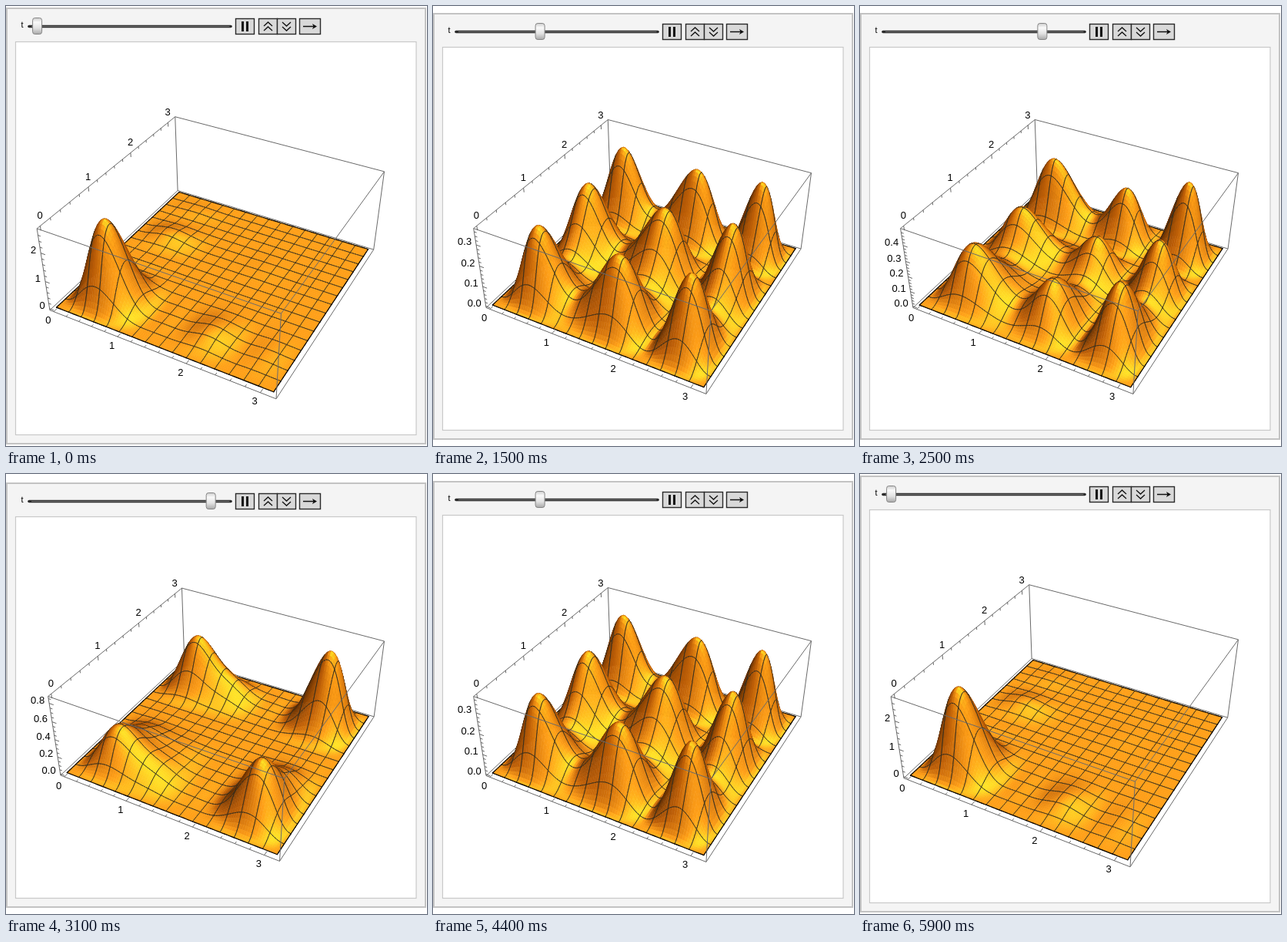
Animation, 547 px wide and 571 px high, one loop 6 s. Source, as an HTML page with a canvas:

```html
<!DOCTYPE html>
<html>
<head>
<meta charset="utf-8">
<style>
html, body { margin: 0; width: 100%; height: 100%; overflow: hidden; background: #fff; }
canvas { display: block; }
</style>
</head>
<body>
<canvas id="stage" width="547" height="571"></canvas>
<script>
const ctx = document.getElementById('stage').getContext('2d');
const PI = Math.PI, PAD = 1.04, CELLS = 96, MESH = 6, FONT = '"Liberation Sans", Arial, sans-serif';

// Probability density of four equally mixed box states in one dimension
function density(x, t) {
  let re = 0, im = 0;
  for (let n = 1; n <= 4; n++) {
    re += Math.sin(n * x) * Math.cos(n * n * t);
    im += Math.sin(n * x) * Math.sin(n * n * t);
  }
  return (re * re + im * im) / (2 * PI);
}

// Perspective camera at (1.3, -2.4, 2) looking at the box centre
const view = { scale: 1, cx: 0, cy: 0 };
function camera(x, y, z) {
  const depth = 3.3838 - (0.3842 * x - 0.7093 * y + 0.5911 * z);
  return [(0.8793 * x + 0.4763 * y) / depth,
          (-0.2815 * x + 0.5198 * y + 0.8066 * z) / depth];
}
function project(x, y, z) {
  const [u, v] = camera(x, y, z);
  return [view.cx + view.scale * u, view.cy - view.scale * v];
}
const boxX = x => (x / PI - 0.5) / PAD;
const boxZ = (z, zMax) => (z / zMax - 0.5) * 0.4 / PAD;

function line(points, color, width = 1) {
  ctx.strokeStyle = color;
  ctx.lineWidth = width;
  ctx.beginPath();
  points.forEach(p => ctx.lineTo(p[0], p[1]));
  ctx.stroke();
}
function text(s, x, y, size = 13) {
  ctx.font = size + 'px ' + FONT;
  ctx.textAlign = 'center';
  ctx.textBaseline = 'alphabetic';
  ctx.fillStyle = '#000';
  ctx.fillText(s, x, y + size * 0.36);
}
function rect(x, y, w, h, fill, stroke, width = 1) {
  ctx.fillStyle = fill;
  ctx.fillRect(x, y, w, h);
  ctx.strokeStyle = stroke;
  ctx.lineWidth = width;
  ctx.strokeRect(x, y, w, h);
}

// Light level followed by its colour
const RAMP = [[0, 104, 50, 4], [0.5, 190, 95, 8], [0.81, 255, 159, 24], [1, 255, 226, 38]];
function shade(sx, sy) {
  const light = (-0.48 * sx + 0.34 * sy + 0.81) / Math.hypot(sx, sy, 1);
  const v = Math.min(1, Math.max(0, light));
  const i = v < RAMP[1][0] ? 0 : v < RAMP[2][0] ? 1 : 2;
  const a = RAMP[i], b = RAMP[i + 1], k = (v - a[0]) / (b[0] - a[0]);
  return `rgb(${[1, 2, 3].map(c => Math.round(a[c] + (b[c] - a[c]) * k))})`;
}

function drawSurface(t, zMax) {
  const f = [], pts = [];
  for (let i = 0; i <= CELLS; i++) f.push(density(i * PI / CELLS, t));
  const height = (i, j) => boxZ(f[i] * f[j], zMax);
  for (let i = 0; i <= CELLS; i++) {
    pts.push(f.map((_, j) => project(boxX(i * PI / CELLS), boxX(j * PI / CELLS), height(i, j))));
  }
  const edge = (k, a, b) => {
    if (k % MESH) return;
    const border = k === 0 || k === CELLS;
    line([a, b], border ? '#000' : '#2b2b22', border ? 1.2 : 0.9);
  };
  const slope = CELLS * PAD / 2;
  ctx.lineCap = 'round';
  // Far cells first: the camera sits beyond large x and small y
  for (let j = CELLS - 1; j >= 0; j--) {
    for (let i = 0; i < CELLS; i++) {
      const a = pts[i][j], b = pts[i + 1][j], c = pts[i + 1][j + 1], d = pts[i][j + 1];
      const h0 = height(i, j), h1 = height(i + 1, j), h2 = height(i + 1, j + 1), h3 = height(i, j + 1);
      const color = shade((h1 + h2 - h0 - h3) * slope, (h2 + h3 - h0 - h1) * slope);
      ctx.fillStyle = ctx.strokeStyle = color;
      ctx.lineWidth = 0.6;
      ctx.beginPath();
      [a, b, c, d].forEach(p => ctx.lineTo(p[0], p[1]));
      ctx.closePath();
      ctx.fill();
      ctx.stroke();
      edge(j + 1, d, c);
      edge(i, a, d);
      edge(i + 1, b, c);
      edge(j, a, b);
    }
  }
  ctx.lineCap = 'butt';
}

const corner = (x, y, z) => project(x * 0.5, y * 0.5, z * 0.2);
const EDGE = '#6a6a6a';
function drawBackEdges() {
  line([corner(-1, -1, -1), corner(-1, 1, -1), corner(1, 1, -1), corner(1, 1, 1),
        corner(-1, 1, 1), corner(-1, 1, -1)], EDGE);
}
function drawFrontEdges() {
  line([corner(1, 1, 1), corner(1, -1, 1), corner(-1, -1, 1), corner(-1, 1, 1)], EDGE);
  line([corner(-1, -1, 1), corner(-1, -1, -1), corner(1, -1, -1), corner(1, 1, -1)], EDGE);
  line([corner(1, -1, 1), corner(1, -1, -1)], EDGE);
}

// Smallest step that gives at most five labels
const pickStep = zMax => [0.1, 0.2, 0.5, 1].find(s => Math.floor(zMax / s) < 5);

function drawTicks(zMax, step) {
  const tick = (from, to) => line([project(...from), project(...to)], '#555', 0.9);
  for (let i = 0; i <= 15; i++) {
    const p = boxX(i / 5), len = i % 5 ? 0.012 : 0.021;
    tick([p, -0.5, -0.2], [p, -0.5 + len, -0.2]);
    tick([-0.5, p, 0.2], [-0.5, p, 0.2 - len]);
    if (i % 5 === 0) {
      const a = project(p, -0.5, -0.2), b = project(-0.5, p, 0.2);
      text(i / 5, a[0] - 7.2, a[1] + 11);
      text(i / 5, b[0] - 0.4, b[1] - 13.8);
    }
  }
  const parts = step === 0.2 ? 4 : 5, digits = step < 1 ? 1 : 0;
  for (let i = 0; i * step / parts <= zMax; i++) {
    const z = boxZ(i * step / parts, zMax), major = i % parts === 0;
    tick([-0.5, -0.5, z], [-0.5 + (major ? 0.021 : 0.012), -0.5, z]);
    if (major) {
      const p = project(-0.5, -0.5, z);
      text((i / parts * step).toFixed(digits), p[0] - 6 - (digits ? 9 : 3.6), p[1] - 4.6);
    }
  }
}

function drawControls(top, thumb) {
  const y = top + 23.5, b = Math.round(top + 14) + 0.5;
  text('t', 21, y - 1, 11);
  ctx.lineCap = 'round';
  line([[30, y + 1], [292, y + 1]], '#2c2c2c', 3.6);
  line([[33, y + 1], [290, y + 1]], '#777', 1);
  ctx.lineCap = 'butt';

  const shine = ctx.createLinearGradient(0, y - 11, 0, y + 11);
  shine.addColorStop(0, '#c4c4c4');
  shine.addColorStop(0.3, '#fafafa');
  shine.addColorStop(0.65, '#e2e2e2');
  shine.addColorStop(1, '#a8a8a8');
  ctx.fillStyle = shine;
  ctx.strokeStyle = '#858585';
  ctx.lineWidth = 1;
  ctx.beginPath();
  ctx.roundRect(thumb - 6, y - 10, 12, 21, 3);
  ctx.fill();
  ctx.stroke();

  [[298, 24], [328, 24], [352, 24], [381, 27]].forEach(([x, w]) =>
    rect(x + 0.5, b, w, 20, '#d9d9d9', '#2a2a2a', 1.4));
  const m = b + 10;
  line([[307.5, m - 6.5], [307.5, m + 6.5]], '#111', 3);
  line([[313.5, m - 6.5], [313.5, m + 6.5]], '#111', 3);
  const chevron = (x, tip, dir) =>
    line([[x - 5.5, tip + dir * 5], [x, tip], [x + 5.5, tip + dir * 5]], '#111', 1.3);
  [-5.5, 0.5].forEach(d => {
    chevron(340.5, m + d, 1);
    chevron(364.5, m - d, -1);
  });
  line([[386, m], [402, m]], '#111', 1.5);
  ctx.fillStyle = '#111';
  ctx.beginPath();
  [[404, m], [398, m - 3.5], [399.5, m], [398, m + 3.5]].forEach(p => ctx.lineTo(...p));
  ctx.fill();
}

function draw(t) {
  let peak = 0;
  for (let i = 0; i <= 400; i++) peak = Math.max(peak, density(i * PI / 400, t));
  const zMax = peak * peak, step = pickStep(zMax);

  // The plot is scaled so that the top height label meets the left margin
  const topLabel = Math.floor(zMax / step) * step;
  const labelX = camera(-0.5, -0.5, boxZ(topLabel, zMax))[0];
  const labelWidth = step < 1 ? 18.1 : 7.2;
  view.scale = (453.5 - labelWidth) / (camera(0.5, 0.5, 0.2)[0] - labelX);
  const growth = view.scale - 1048;
  view.cx = 491.5 - 0.1977 * view.scale;
  view.cy = 302.8 + 0.022 * growth;
  const inner = Math.round(494 + 0.444 * growth);
  const top = Math.round(11 - 0.25 * growth);

  ctx.fillStyle = '#fff';
  ctx.fillRect(0, 0, 547, 571);
  rect(1, top + 1, 544, inner + 55, '#f4f4f4', '#c3c3c3', 2);
  rect(12.5, top + 44.5, 520.5, inner, '#fff', '#c8c8c8', 1.2);
  drawControls(top, 40.6 + 47.4 * t);
  drawBackEdges();
  drawSurface(t, zMax);
  drawFrontEdges();
  drawTicks(zMax, step);
}

// Hold, run forward, then back again
let shown = -1;
function tickClock(now) {
  const n = Math.floor(now / 100) % 60;
  const t = Math.max(0, 0.2062 * (Math.min(n, 59 - n) - 4.92));
  if (t !== shown) draw(shown = t);
  requestAnimationFrame(tickClock);
}
draw(shown = 0);
requestAnimationFrame(tickClock);
</script>
</body>
</html>
```
